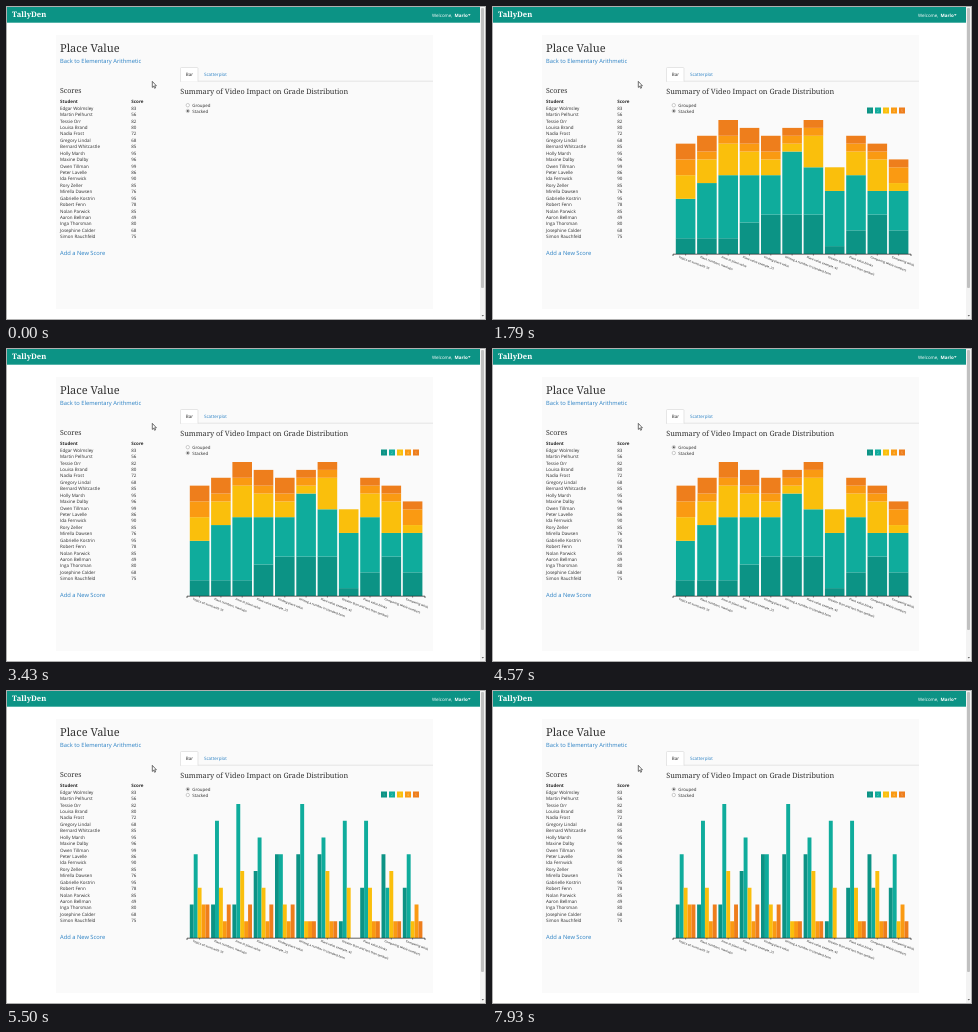
Write an HTML page that moves like this. It is 480 by 314 pixels and loops after 8 s.

```html
<!DOCTYPE html>
<html lang="en">
<head>
<meta charset="utf-8">
<title>Place Value</title>
<style>
  html, body { margin: 0; width: 100%; height: 100%; overflow: hidden; background: #fff; }
  svg { display: block; width: 480px; height: 314px; }
  text { font-family: "Open Sans", sans-serif; font-size: 4.5px; fill: #2b2b2b; text-rendering: geometricPrecision; }
  .serif { font-family: "Noto Serif", serif; fill: #333; }
  .h1 { font-size: 11px; }
  .h2 { font-size: 7.27px; }
  .h3 { font-size: 7px; }
  .link { fill: #2a80c4; }
  .big { font-size: 5.77px; }
  .bold { font-weight: 700; }
  .light { fill: #fff; }
  .brand { font-size: 7.6px; font-weight: 700; fill: #fff; }
  .radio { font-size: 4.4px; }
  .label { font-size: 3px; fill: #111; }
  .mark { font-size: 3.4px; fill: #fff; fill-opacity: .5; text-anchor: middle; }
</style>
</head>
<body>
<svg viewBox="0 0 480 314">
  <defs><clipPath id="edge"><rect x="176" y="95" width="246" height="180"/></clipPath></defs>

  <!-- page -->
  <rect width="480" height="314" fill="#fff"/>
  <rect x="50" y="29" width="377" height="274" fill="#fafafa"/>
  <rect x="1" y="1" width="473" height="15.7" fill="#0c9385"/>
  <rect x="474" y="1" width="5" height="312" fill="#f3f3f3"/>
  <rect x="475" y="2" width="3" height="280" rx="1" fill="#c0c0c0"/>
  <path d="M475.6 309h2.4l-1.2 1.5z" fill="#666"/>
  <rect x=".5" y=".5" width="479" height="313" fill="none" stroke="#b0b0b0"/>

  <text class="serif brand" x="6" y="11.4">TallyDen</text>
  <text class="light" x="426" y="10.6" font-size="4.4">Welcome,</text>
  <text class="light bold" x="448.5" y="10.6">Marlo</text>
  <path d="M462 8.3h2.6l-1.3 1.5z" fill="#fff"/>

  <text class="serif h1" x="54" y="45.8">Place Value</text>
  <text class="link big" x="54" y="57">Back to Elementary Arithmetic</text>

  <!-- tabs -->
  <path d="M174 75.2H427" stroke="#dcdcdc" stroke-width=".7"/>
  <path d="M174.5 75.6V62.5q0-1 1-1H191q1 0 1 1V75.6" fill="#fff" stroke="#dcdcdc" stroke-width=".7"/>
  <text x="179.8" y="69.7">Bar</text>
  <text class="link" x="198" y="69.7">Scatterplot</text>

  <text class="serif h3" x="54" y="87.2">Scores</text>
  <text class="serif h2" x="174.3" y="87.5">Summary of Video Impact on Grade Distribution</text>
  <text class="bold" x="54" y="97.2">Student</text>
  <text class="bold" x="125.3" y="97.2">Score</text>
  <g id="scores"></g>
  <text class="link big" x="54" y="248.6">Add a New Score</text>

  <!-- options -->
  <g fill="#fff" stroke="#aaa" stroke-width=".6">
    <circle cx="181.8" cy="99.2" r="1.7"/>
    <circle cx="181.8" cy="105" r="1.7"/>
  </g>
  <circle id="dot" cx="181.8" cy="105" r="1" fill="#555"/>
  <text class="radio" x="186.3" y="101.1">Grouped</text>
  <text class="radio" x="186.3" y="106.9">Stacked</text>

  <g id="chart" clip-path="url(#edge)">
    <g id="bars"></g>
    <path d="M181 250V248.2H419V250" fill="none" stroke="#222" stroke-width=".7"/>
    <g id="labels"></g>
    <g id="legend"></g>
  </g>

  <!-- pointer -->
  <path d="M146.3 75.4v6l1.3-1.2 1 2.1 1-.5-1-2h1.8z" fill="#fff" stroke="#111" stroke-width=".6"/>
</svg>
<script>
const LOOP = 8000, SHOW = 430, PICK = 4360, GROUP = 4470;
const GROW = 250, SLIDE = 450, DROP = 500, STAGGER = 10;
const BASE = 248, HEIGHT = 134, LEFT = 183.8, STEP = 21.3, WIDTH = 19.6;

const colors = ["#0c9385", "#0fac9c", "#fabf0c", "#fa9a12", "#ee7e1c"];
// One string per column: the count in each layer.
const columns = ["25322", "27312", "28412", "46312", "55212", "58111",
  "56411", "17300", "37311", "53411", "35121"].map(s => [...s].map(Number));
const titles = ["Topics on sums with 10", "Place numbers, markups", "Intro to place value",
  "Place value example, 25", "Finding place value", "Writing a number in standard form",
  "Place value example, 42", "Greater than and less than symbols", "Place value blocks",
  "Comparing whole numbers", "Comparing whole"];
const students = `Edgar Wolmsley 83,Martin Pelhurst 56,Tessie Orr 82,Louisa Brand 80,Nadia Frost 72,
Gregory Lindal 68,Bernard Whitcastle 85,Holly Marsh 95,Maxine Dalby 96,Owen Tillman 99,
Peter Lavelle 86,Ida Fernwick 90,Rory Zeller 85,Mirella Dawsen 76,Gabrielle Kostrin 95,
Robert Fenn 78,Nolan Parwick 85,Aaron Bellman 49,Inga Thorsman 80,Josephine Calder 68,
Simon Rauchfeld 75`.split(",").map(s => s.trim());

const $ = id => document.getElementById(id);
function add(parent, tag, attrs, text) {
  const el = document.createElementNS("http://www.w3.org/2000/svg", tag);
  set(el, attrs);
  if (text !== undefined) el.textContent = text;
  return parent.appendChild(el);
}
function set(el, attrs) {
  for (const k in attrs) el.setAttribute(k, attrs[k]);
}

students.forEach((row, i) => {
  const cut = row.lastIndexOf(" "), y = 103.7 + i * 6.425;
  add($("scores"), "text", { x: 54, y }, row.slice(0, cut));
  add($("scores"), "text", { x: 125.3, y }, row.slice(cut + 1));
});

titles.forEach((title, i) => {
  const x = LEFT + i * STEP;
  add($("labels"), "path", { d: `M${x + WIDTH / 2} ${BASE}v1.6`, stroke: "#222", "stroke-width": .5 });
  add($("labels"), "text", { class: "label", transform: `translate(${x + 2.8} 251.8) rotate(21)` }, title);
});

colors.forEach((fill, i) => {
  const x = 375 + i * 8;
  add($("legend"), "rect", { x, y: 101.5, width: 6, height: 6, fill });
  add($("legend"), "text", { class: "mark", x: x + 3, y: 105.8 }, i + 1);
});

const sum = list => list.reduce((a, b) => a + b, 0);
const stackUnit = HEIGHT / Math.max(...columns.map(sum));
const groupUnit = HEIGHT / Math.max(...columns.flat());

const bars = colors.flatMap((fill, layer) => columns.map((col, i) => ({
  el: add($("bars"), "rect", { fill }),
  i, layer, count: col[layer], below: sum(col.slice(0, layer))
})));

const mix = (a, b, p) => a + (b - a) * p;
function ease(t) {
  t = Math.min(1, Math.max(0, t));
  return t < .5 ? 4 * t ** 3 : 1 - 4 * (1 - t) ** 3;
}

function drawBar({ el, i, layer, count, below }, time) {
  const wait = i * STAGGER;
  const grow = ease((time - SHOW - wait) / GROW);
  const slide = ease((time - GROUP - wait) / SLIDE);
  const drop = ease((time - GROUP - SLIDE - wait) / DROP);
  const height = mix(count * stackUnit * grow, count * groupUnit, drop);
  const bottom = mix(below * stackUnit * grow, 0, drop);
  set(el, {
    x: LEFT + i * STEP + slide * layer * WIDTH / 5,
    y: BASE - bottom - height,
    width: mix(WIDTH, WIDTH / 5, slide),
    height
  });
}

function draw() {
  const time = performance.now() % LOOP;
  $("chart").style.display = time < SHOW ? "none" : "";
  $("dot").setAttribute("cy", time < PICK ? 105 : 99.2);
  for (const bar of bars) drawBar(bar, time);
  requestAnimationFrame(draw);
}
draw();
</script>
</body>
</html>
```
